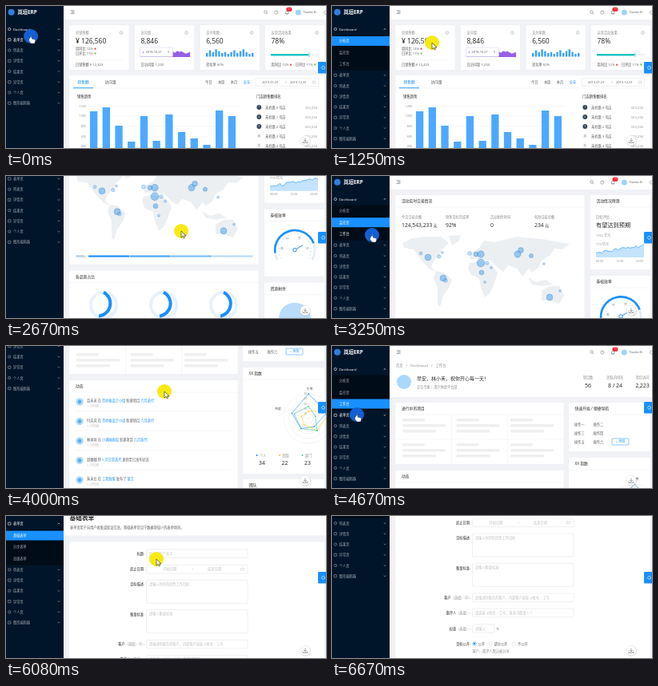
An HTML page that plays this animation: 400x178 px, repeating every 6910 ms.

```html
<!DOCTYPE html>
<html lang="zh-CN">
<head>
<meta charset="utf-8">
<title>Admin console tour</title>
<style>
html, body { margin: 0; width: 100%; height: 100%; overflow: hidden; background: #f0f2f5 }
svg { display: block }
body > svg { width: 100vw; height: 100vh; font-family: "Open Sans", "Noto Sans CJK SC", "Noto Sans CJK", sans-serif }
</style>
</head>
<body>
<svg viewBox="0 0 400 178">
  <g id="scroll"><g id="pages"></g><g id="top"></g><g id="side"></g></g>
  <g id="fixed"></g>
  <g id="cursor">
    <circle r="9" id="halo"/>
    <path id="arrow" d="M0 0V8L2 6.3 3.3 9 4.5 8.4 3.3 5.9H6Z" fill="#fff" stroke="#222" stroke-width=".6"/>
    <path id="hand" d="M-.6 0Q.3-1 1.2 0V3L5 4Q6 4.3 5.6 6L4.8 9H.3L-2.6 5.4Q-2-.2 4-.6 4.8Z" fill="#fff" stroke="#234" stroke-width=".5"/>
  </g>
</svg>
<script>
const LOOP = 6910, BLUE = '#1890ff', DARK = '#262626', GRAY = '#8c8c8c', PALE = '#bfbfbf';
const el = id => document.getElementById(id);
const rnd = n => { const v = Math.sin(n * 12.9898) * 43758.5453; return v - Math.floor(v); };
const range = (n, fn) => Array.from({ length: n }, (_, i) => fn(i)).join('');

// Drawing helpers; text is placed by its vertical centre.
const text = (x, y, s, size = 4.2, fill = '#595959', more = '') =>
  `<text x="${x}" y="${y + size * .36}" font-size="${size}" fill="${fill}" ${more}>${s}</text>`;
const rect = (x, y, w, h, fill = '#fff', more = '') =>
  `<rect x="${x}" y="${y}" width="${w}" height="${h}" fill="${fill}" ${more}/>`;
const disc = (x, y, r, fill, more = '') => `<circle cx="${x}" cy="${y}" r="${r}" fill="${fill}" ${more}/>`;
const shape = (d, fill, more = '') => `<path d="${d}" fill="${fill}" ${more}/>`;
const line = (d, stroke = '#e8e8e8', width = .4, more = '') =>
  `<path d="${d}" fill="none" stroke="${stroke}" stroke-width="${width}" ${more}/>`;
const box = (x, y, w, h) => rect(x, y, w, h, '#fff', 'rx="1" stroke="#d9d9d9" stroke-width=".4"');
const blue = s => `<tspan fill="${BLUE}">${s}</tspan>`;
const bold = 'font-weight="600"', middle = 'text-anchor="middle"', end = 'text-anchor="end"';
const up = '<tspan fill="#f5222d" font-size="3">▲</tspan>', down = '<tspan fill="#52c41a" font-size="3">▼</tspan>';

const card = (x, y, w, h, title) => rect(x, y, w, h) +
  (title ? text(x + 7.5, y + 7.5, title, 4.8, DARK, 'font-weight="500"') + line(`M${x} ${y + 15}h${w}`) : '');
const info = (x, y) => disc(x, y, 1.9, 'none', `stroke="${GRAY}" stroke-width=".4"`) + line(`M${x} ${y - .3}v1.3m0-2v.4`, GRAY);
const pageHead = (crumbs, h) => rect(72, 17, 328, h) + text(80, 24, crumbs, 4.2, GRAY);

function analysis() {
  const stat = (x, label, value, foot) => card(x, 24, 74, 56) + text(x + 7.5, 33.5, label, 4.2, GRAY) +
    info(x + 64.5, 33.5) + text(x + 7.5, 44, value, 8.5, DARK) +
    line(`M${x + 7.5} 67.5h59`) + text(x + 7.5, 73, foot);
  const peaks = [4, 7, 5, 8, 6, 4, 5, 3, 5, 7, 4, 6, 8, 5, 3, 4];
  const tops = [132, 127, 150, 170, 138, 169, 136, 158, 166, 174, 131, 138];
  const visits = 'M168 64' + range(24, i => `L${168 + i * 2.7} ${60.5 - 5.5 * rnd(i + 3)}`) + 'V64Z';
  return stat(79.5, '总销售额', '¥ 126,560', '日销售额 ¥ 12,423') +
    text(87, 53.5, `周同比 12% ${up}`) + text(87, 59.7, `日环比 11% ${down}`) +
    stat(161, '访问量', '8,846', '日访问量 1,234') + shape(visits, '#975fe4') +
    rect(167.5, 52, 41, 11.5, '#fff', 'rx="1" stroke="#c9d3e0" stroke-width=".5"') +
    disc(171.5, 58, .8, '#975fe4') + text(174.5, 58, '2018-10-21', 3.9) + text(202, 58, '5', 3.9) +
    stat(242.7, '支付笔数', '6,560', '转化率 60%') +
    peaks.map((h, i) => rect(250 + i * 3.8, 63.5 - h * 1.15, 2.4, h * 1.15, '#3ba0ff')).join('') +
    stat(324, '运营活动效果', '78%', `周同比 12% ${up}　日环比 11% ${down}`) +
    rect(331, 60, 60, 2.4, '#f0f2f5') + rect(331, 60, 47, 2.4, '#13c2c2') + line('M379 58.5v5.4', '#13c2c2', .7) +
    card(79.5, 87, 318.5, 120) + line('M79.5 103h318.5') + rect(84, 102.3, 25, .9, BLUE) +
    text(89.5, 95.5, '销售额', 4.8, BLUE) + text(123.5, 95.5, '访问量', 4.8) +
    ['今日', '本周', '本月', '全年'].map((s, i) => text(249 + i * 15.9, 95.5, s, 4.2, i < 3 ? '#595959' : BLUE)).join('') +
    box(312, 90.5, 78.5, 10) + text(320, 95.5, '2019-01-01', 4) + text(349, 95.5, '~') + text(355, 95.5, '2019-12-31', 4) +
    line('M383 94h4v3.4h-4zM383 95.2h4', PALE) + text(89, 113.5, '销售趋势', 4.4, DARK) +
    range(5, i => text(100, 125.5 + i * 12.6, 1200 - i * 200, 3.7, GRAY, end) + line(`M103 ${125.5 + i * 12.6}H291`, '#eee')) +
    tops.map((y, i) => rect(105 + i * 15.7, y, 9.3, 200 - y, '#4da9ff')).join('') +
    text(313, 113.5, '门店销售额排名', 4.4, DARK) +
    range(6, i => disc(316.3, 127 + i * 12, 2.9, i < 3 ? '#314659' : '#f0f2f5') +
      text(316.3, 127 + i * 12, i + 1, 3.4, i < 3 ? '#fff' : '#555', middle) +
      text(324, 127 + i * 12, `禾岭路 ${i} 号店`) + text(389, 127 + i * 12, '323,234', 4.2, GRAY, end));
}

function monitor() {
  const lands = [
    'M88 84L100 78 118 76 136 76 146 84 138 92 134 100 127 106 124 114 130 120 122 117 112 106 102 92 90 90Z',
    'M146 75L161 74 158 82 150 87Z',
    'M130 119L140 121 150 130 146 140 138 152 135 164 132 160 132 140 127 128Z',
    'M172 109L186 107 200 111 207 122 203 134 198 146 191 152 186 140 184 128 174 124 170 116Z',
    'M172 104L174 96 184 90 190 81 204 83 230 76 262 79 297 85 288 92 278 91 272 100 262 106 258 115 250 121 246 116 238 126 231 116 220 112 214 120 206 114 198 106 186 104Z',
    'M245 127L255 133 267 130 276 136 262 138 250 136Z',
    'M262 144L272 138 284 138 290 150 284 160 270 156 262 156Z'];
  const spots = [[120, 102, 4], [111, 97, 2], [134, 101, 2.2], [138, 96, 1.4], [139, 128, 4], [142, 131, 2.4],
    [172, 97, 2.4], [180, 98, 3], [186, 98, 4.3], [186, 109, 5], [194, 109, 2.2], [187, 121, 3], [199, 115, 1.5],
    [191, 133, 1.5], [232, 98, 4.2], [236, 93, 3.4], [249, 100, 2.6], [265, 110, 1.5], [272, 152, 4], [285, 144, 1.5]];
  const kpi = (x, label, value) => text(x, 51, label, 4.2, GRAY) + text(x, 61.5, value, 6.8, DARK);
  const unit = '<tspan font-size="5"> 元</tspan>';
  const ticks = range(21, i => {
    const a = (150 + i * 12) * Math.PI / 180, c = Math.cos(a), s = Math.sin(a);
    return line(`M${361 + 19 * c} ${176 + 19 * s}L${361 + 21 * c} ${176 + 21 * s}`, '#9cb', .4);
  });
  return card(79.5, 24, 236, 170, '活动实时交易情况') +
    kpi(87, '今日交易总额', '124,543,233' + unit) + kpi(142, '销售目标完成率', '92%') +
    kpi(198, '活动剩余时间', '0') + kpi(253, '每秒交易总额', '234' + unit) +
    lands.map(d => shape(d, '#eceff2')).join('') +
    spots.map(([x, y, r]) => disc(x, y, r, '#3f9be8', `fill-opacity="${r > 2.5 ? .5 : .3}" stroke="#2d80d0" stroke-opacity=".6" stroke-width=".5"`)).join('') +
    text(87.5, 184, '88MB/s', 3.4, '#4080b0') +
    ['#1f8fff', '#4aa8f5', '#79bff8', '#b5dcfb'].map((c, i) => rect(103 + i * 51.5, 182.8, 51, 2.2, c)).join('') +
    card(323, 24, 75, 93, '活动情况预测') + text(330, 51, '目标评估', 4.2, GRAY) + text(330, 61.5, '有望达到预期', 7.2, DARK) +
    '<g id="live"></g>' +
    ['00:00', '12:00', '23:00'].map((s, i) => text(330 + i * 25, 106.5, s, 3.7, GRAY)).join('') +
    card(323, 125, 75, 84, '券核效率') +
    line('M339.3 188.5A25 25 0 1 1 382.7 188.5', '#e3edf7', 2.4) + line('M336.4 180A25 25 0 0 1 384.5 167.5', BLUE, 2.6) + ticks +
    [['差', 345, 174], ['中', 352, 162], ['良', 367, 161], ['优', 377, 174]].map(([s, x, y]) => text(x, y, s, 3.8, GRAY, middle)).join('') +
    line('M361 176L371 170', BLUE, 1) + disc(361, 176, 2.2, '#fff', `stroke="${BLUE}" stroke-width="1"`) +
    card(79.5, 202, 236, 100, '各品类占比') + card(323, 217, 75, 85, '资源剩余') +
    range(3, i => disc(122 + i * 75, 245, 16, 'none', 'stroke="#e8f1fb" stroke-width="4"') +
      line(`M${122 + i * 75} 229a16 16 0 0 1 ${i - 6} ${30}`, BLUE, 4)) + disc(361, 262, 20, '#b9dcfb');
}

function liveChart(t) {
  const seed = Math.floor(t / 250), late = t > 2600;
  const top = 'M330 ' + range(25, i => `${i ? 'L' + (330 + i * 2.5) + ' ' : ''}${98.5 - i * .4 - 4 * rnd(i + seed * 31)}`);
  return text(330, 75, (late ? 1352 : 1118) + ' 亿元', 4, GRAY) + text(330, 85.5, (late ? 715 : 694) + ' 亿元', 4, GRAY) +
    line('M330 80h60M330 90.5h60', '#e4e4e4', .3, 'stroke-dasharray="1"') +
    shape(top + 'V102H330Z', '#c4e3ff') + line(top, BLUE, .6);
}

function workbench() {
  const feed = [`苗禾禾 在 ${blue('青岭格设计小组')} 新建项目 ${blue('六月迭代')}`, `付岚岚 在 ${blue('青岭格设计小组')} 新建项目 ${blue('六月迭代')}`,
    `林垣垣 在 ${blue('小满画画组')} 新建项目 ${blue('六月迭代')}`, `周穗穗 将 ${blue('5 月日常迭代')} 更新至已发布状态`, `朱禾左 在 ${blue('工程效能')} 发布了 ${blue('留言')}`];
  const spoke = (i, r) => { const a = (i * 72 - 90) * Math.PI / 180; return `${378 + r * Math.cos(a)} ${204 + r * Math.sin(a)}`; };
  const web = (vals, c) => line('M' + vals.map((v, i) => spoke(i, v * 3.1)).join('L') + 'Z', c, .6) +
    vals.map((v, i) => { const [x, y] = spoke(i, v * 3.1).split(' '); return disc(x, y, .8, c); }).join('');
  return pageHead('首页　/　Dashboard　/　工作台', 47) + disc(90, 45, 9, '#a9d8fb') +
    text(106, 41, '早安，林小禾，祝你开心每一天！', 6, DARK) + text(106, 51, '交互专家 | 用户体验平台部', 4.2, GRAY) +
    [['项目数', 56], ['团队内排名', '8 / 24'], ['项目访问', '2,223']].map(([s, v], i) =>
      text(320 + i * 34, 39, s, 4.2, GRAY, middle) + text(320 + i * 34, 49, v, 7, DARK, middle)).join('') +
    card(79.5, 71, 210, 77, '进行中的项目') + line('M149.5 86V148M219.5 86V148M79.5 117H289.5') +
    range(18, i => rect(88 + i % 3 * 67.5, 91 + Math.floor(i / 3) * 7 + (i > 8 ? 10 : 0), i % 9 < 3 ? 28 : i % 9 < 6 ? 54 : 42, 3.4, '#efefef', 'rx="1"')) +
    card(79.5, 156, 210, 150, '动态') +
    feed.map((s, i) => { const y = 181.5 + i * 24.5;
      return disc(92, y + 1.5, 4.8, '#b6dcf8') + disc(92, y + 1.5, 2.4, '#5aaeea') +
        text(101, y, s) + text(101, y + 7.5, '1 小时前', 4, PALE) + line(`M87 ${y + 13.2}h195`); }).join('') +
    card(296, 71, 102, 61, '快速开始 / 便捷导航') +
    ['一', '二', '三', '四', '五', '六'].map((s, i) => text(303 + i % 2 * 23.5, 98 + Math.floor(i / 2) * 11, '操作' + s)).join('') +
    rect(350, 116, 21, 8, '#fff', `rx="1" stroke="${BLUE}" stroke-width=".5"`) + text(360.5, 120, '+ 添加', 4, BLUE, middle) +
    card(296, 140, 102, 133, 'XX 指数') +
    range(5, i => disc(378, 204, 6.2 * (i + 1), 'none', 'stroke="#e2e2e2" stroke-width=".4"') + line(`M378 204L${spoke(i, 31)}`)) +
    web([10, 8, 4, 5, 7], BLUE) + web([3, 9, 6, 3, 3], '#facc14') + web([5, 3, 6, 5, 6], '#2fc2a8') +
    range(5, i => text(376, 173 + i * 6.2, 30 - i * 5, 3.3, GRAY, end)) + text(379.5, 167, '引用', 3.8, '#555', middle) + text(340, 192, '热度', 3.8, '#555', middle) +
    [['个人', 34, BLUE], ['团队', 22, '#facc14'], ['部门', 23, '#2fc2a8']].map(([s, v, c], i) =>
      disc(313.5 + i * 28.5, 250, 1, c) + text(317 + i * 28.5, 250, s, 4.2, GRAY) + text(320 + i * 28.5, 260, v, 6.8, DARK, middle)).join('') +
    card(296, 280, 102, 60, '团队');
}

function form() {
  const label = (y, s, optional) => text(173, y, s + (optional ? `<tspan fill="${GRAY}">（选填）</tspan>` : '') + ':', 4.2, DARK, end);
  const field = (y, h, hint, w = 126.5) => box(175.5, y, w, h) + text(179, y + 5.3, hint, 4.2, PALE);
  const radio = (x, s, on) => disc(x, 251, 2.2, '#fff', `stroke="${on ? BLUE : '#d0d0d0'}" stroke-width=".5"`) +
    (on ? disc(x, 251, 1.2, BLUE) : '') + text(x + 4.5, 251, s);
  return pageHead('首页　/　表单页　/　<tspan fill="#444">基础表单</tspan>', 40) + text(79.5, 35, '基础表单', 7.7, DARK, bold) +
    text(80, 47.5, '表单页用于向用户收集或验证信息，基础表单常见于数据项较少的表单场景。') + card(79.5, 65, 318.5, 240) +
    label(79.8, '标题') + field(74.5, 10.5, '给目标起个名字') +
    label(99.5, '起止日期') + field(94.2, 10.5, '') + text(205, 99.5, '开始日期', 4.2, PALE, middle) + text(232, 99.5, '~', 4.2, GRAY) +
    text(260.5, 99.5, '结束日期', 4.2, PALE, middle) + line('M293.5 97.8h4v3.4h-4zM293.5 99h4', PALE) +
    label(118.5, '目标描述') + field(113, 29, '请输入你的阶段性工作目标') +
    label(156, '衡量标准') + field(150.3, 29, '请输入衡量标准') +
    text(165.5, 193, `客户<tspan fill="${GRAY}">（选填）</tspan>`, 4.2, DARK, end) + info(168.3, 193) + text(173, 193, ':', 4.2, DARK, end) +
    field(188, 10.5, '请描述你服务的客户，内部客户直接 @姓名／工号') +
    label(212.5, '邀评人', 1) + field(207.2, 10.5, '请直接 @姓名／工号，最多可邀请 5 人') +
    label(232, '权重', 1) + field(226.8, 10.5, '请输入', 27.5) + text(205.5, 232, '%') +
    label(251, '目标公开') + radio(178, '公开', 1) + radio(198, '部分公开') + radio(227.5, '不公开') +
    text(175.5, 260.5, '客户、邀评人默认被分享', 4.2, GRAY);
}

const header = () => rect(72, 0, 328, 17) + line('M80.5 5.8h5M82 7.6h3.5M80.5 9.4h5', '#555', .6) +
  disc(324.5, 7.4, 1.7, 'none', 'stroke="#555" stroke-width=".5"') + line('M325.8 8.7l1.5 1.5', '#555', .5) +
  disc(337.8, 8, 2.1, 'none', 'stroke="#555" stroke-width=".4"') + text(337.8, 8, '?', 3, '#555', middle) +
  line('M349 9.6h4.4M349.6 9.4V7.5a1.6 1.6 0 0 1 3.2 0V9.4M350.6 10.4h1.2', '#555', .5) +
  rect(350.5, 1.6, 7, 5.2, '#f5222d', 'rx="2.6"') + text(354, 4.2, '11', 3.4, '#fff', middle) +
  disc(365.3, 8, 3.5, '#9fd4f8') + text(371.5, 8, 'Tovela Ki', 4.1) + disc(399.5, 8, 2, 'none', 'stroke="#555" stroke-width=".4"');

const GROUPS = ['Dashboard', '表单页', '列表页', '详情页', '结果页', '异常页', '个人页', '图形编辑器'];
const SUBS = [['分析页', '监控页', '工作台'], ['基础表单', '分步表单', '高级表单']];
const OPEN = 44.5, DIM = '#a3abb3';

function sidebar(open, active, selected, [cx, cy]) {
  let out = rect(0, 0, 72, 700, '#001529') + disc(6.7, 7.8, 4, '#2f7fe0') + text(14.5, 7.8, '岚垣ERP', 6.3, '#fff', 'font-weight="700"');
  let y = 29;
  const hover = at => cx < 72 && Math.abs(cy - at) < 6.3;
  GROUPS.forEach((name, i) => {
    const c = i === active || hover(y) ? '#fff' : DIM, lift = open[i] > .5 ? -1 : 1;
    out += rect(2.7, y - 1.6, 3.2, 3.2, 'none', `rx="${i % 2 ? .4 : 1.6}" stroke="${c}" stroke-width=".6"`) + text(9, y, name, 4.2, c) +
      line(`M64.7 ${y - .6 * lift}l1.3 ${1.2 * lift} 1.3 ${-1.2 * lift}`, c, .6);
    if (open[i] > 0) {
      const start = y + 7.3;
      out += `<svg x="0" y="${start}" width="72" height="${OPEN * open[i]}">` + rect(0, 0, 72, 45, '#000c17') +
        SUBS[i].map((s, k) => { const at = 7.6 + k * 14.3, on = k === selected[i];
          return (on ? rect(0, at - 6, 72, 12, BLUE) : '') + text(9, at, s, 4.2, on || hover(start + at) ? '#fff' : DIM); }).join('') + '</svg>';
      y += OPEN * open[i];
    }
    y += 13.25;
  });
  return out;
}

// Linear interpolation through [time, ...values] keys.
function track(keys, t) {
  const n = keys.findIndex(k => k[0] > t);
  if (n < 0) return keys[keys.length - 1].slice(1);
  if (!n) return keys[0].slice(1);
  const a = keys[n - 1], b = keys[n], f = (t - a[0]) / (b[0] - a[0]);
  return a.slice(1).map((v, i) => v + (b[i + 1] - v) * f);
}
const SCROLL = [[2000, 0], [2083, 11], [2500, 95], [2620, 95], [3000, 0], [3755, 0], [3990, 113], [4250, 113], [4490, 0], [5850, 0], [6500, 91]];
const MENU = [[330, 0, 0], [580, 1, 0], [4750, 1, 0], [5000, 0, 1]];
const POINTER = [[0, 31, 38], [250, 34, 28], [600, 34, 28], [750, 31, 44], [900, 31, 44], [1250, 125, 46], [1450, 31, 58], [1600, 31, 58],
  [2083, 219, 69], [3000, 219, 69], [3250, 50, 74], [3350, 35, 72], [3600, 35, 72], [3833, 198, 57], [4330, 198, 57], [4490, 31, 86],
  [4750, 31, 86], [5000, 31, 57], [5300, 31, 57], [5583, 188, 54]];

el('pages').innerHTML = [analysis, monitor, workbench, form].map(page => `<g>${page()}</g>`).join('');
el('top').innerHTML = header();
el('fixed').innerHTML = rect(390, 70, 12, 14.5, BLUE, 'rx="1.2"') + disc(396.5, 77.3, 1.9, 'none', 'stroke="#fff" stroke-width="1" stroke-dasharray="1.1 .4"') +
  disc(374.3, 169.2, 6.8, '#000', 'opacity=".1"') + disc(374, 168.6, 6.2, '#fff', 'stroke="#ddd" stroke-width=".4"') +
  line('M374 165.5v4.5m-1.8-1.8l1.8 1.8 1.8-1.8M371 169.5v2h6v-2', '#666', .6);

let shown = -1;
function frame() {
  const step = Math.floor((performance.now() % LOOP + 7) * .012);
  if (step !== shown) {
    shown = step;
    const t = step / .012, [x, y] = track(POINTER, t), [offset] = track(SCROLL, t), inMenu = x < 72;
    const page = [1490, 3480, 5320].filter(at => t >= at).length;
    [...el('pages').children].forEach((g, i) => g.style.display = i === page ? '' : 'none');
    el('live').innerHTML = liveChart(t);
    el('side').innerHTML = sidebar(track(MENU, t), t < 4750 ? 0 : 1, [t < 1450 ? 0 : t < 3420 ? 1 : 2, t < 5230 ? -1 : 0], [x, y + offset]);
    el('scroll').setAttribute('transform', `translate(0 ${-offset})`);
    el('cursor').setAttribute('transform', `translate(${x} ${y})`);
    el('cursor').style.display = t < 6580 ? '' : 'none';
    el('halo').setAttribute('fill', inMenu ? '#1260d6' : '#f7ea14');
    el('arrow').style.display = inMenu ? 'none' : '';
    el('hand').style.display = inMenu ? '' : 'none';
  }
  requestAnimationFrame(frame);
}
frame();
</script>
</body>
</html>
```
